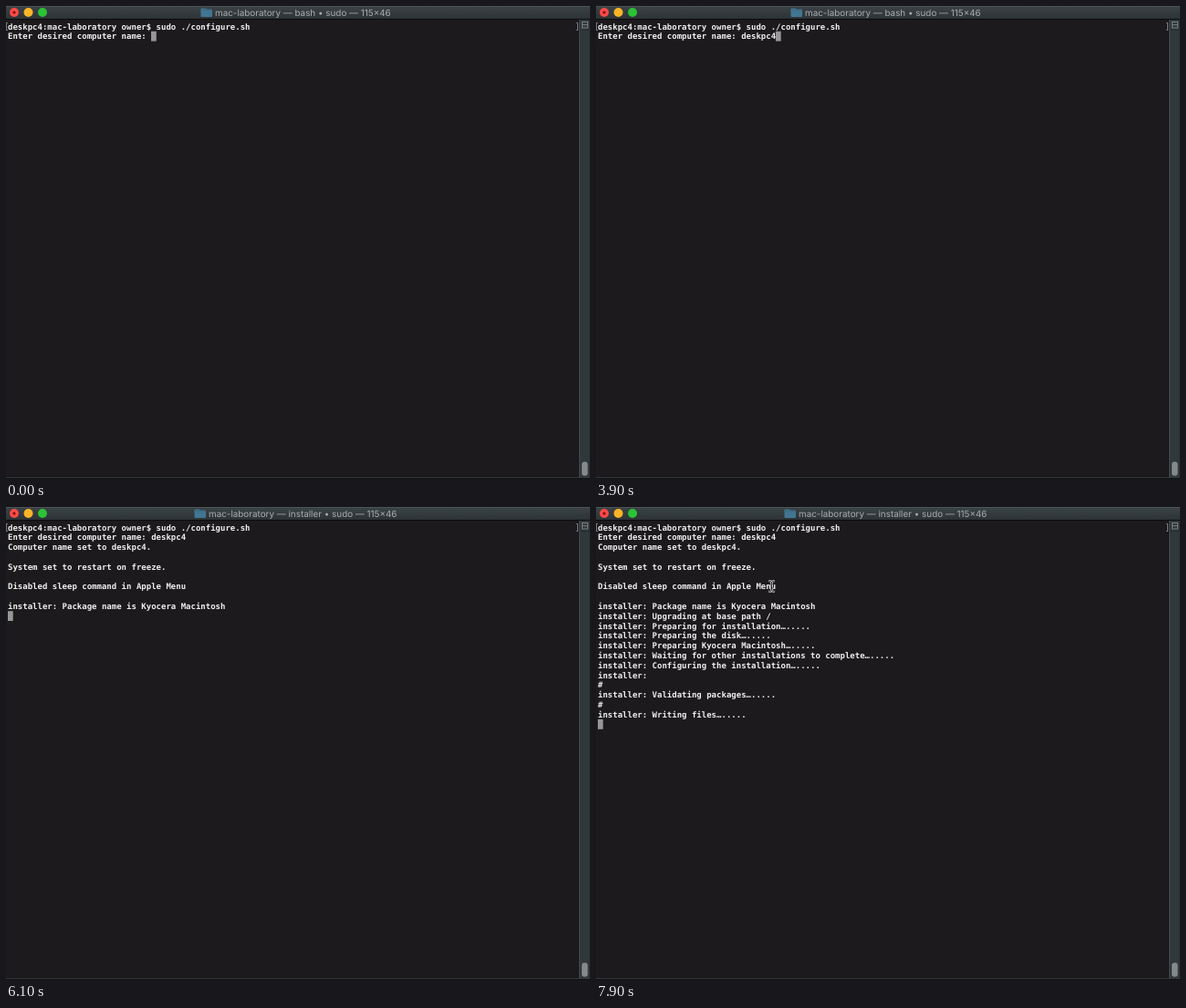
Write an HTML page with a canvas that moves like this. It is 640 by 519 pixels and loops after 8000 ms.

```html
<!DOCTYPE html>
<html lang="en">
<head>
<meta charset="utf-8">
<title>Terminal</title>
<style>
  html, body { margin: 0; width: 100%; height: 100%; overflow: hidden; background: #1c1a1c; }
  canvas { display: block; width: 640px; height: 519px; }
</style>
</head>
<body>
<canvas id="stage" width="640" height="519"></canvas>
<script>
const ctx = document.getElementById('stage').getContext('2d');
const LOOP = 8000;
const CELL = 5.415, ROW = 10.8, LEFT = 2, TOP = 17;
const HOST = 'deskpc4', USER = 'owner';
const ASK = 'Enter desired computer name: ';
const KEY_TIMES = [1500, 1700, 2400, 2700, 2900, 3400, 3900];
const ENTER = 5700, INSTALL = 6000, POINTER = 7800;

// Output lines with the time each one is printed
const OUTPUT = [
  [5700, `Computer name set to ${HOST}.`],
  [5700, ''],
  [5800, 'System set to restart on freeze.'],
  [5800, ''],
  [5800, 'Disabled sleep command in Apple Menu'],
  [5800, ''],
  [6100, 'installer: Package name is Kyocera Macintosh'],
  [6200, 'installer: Upgrading at base path /'],
  [6400, 'installer: Preparing for installation….....'],
  [6500, 'installer: Preparing the disk….....'],
  [6700, 'installer: Preparing Kyocera Macintosh….....'],
  [6900, 'installer: Waiting for other installations to complete….....'],
  [7000, 'installer: Configuring the installation….....'],
  [7100, 'installer:'],
  [7200, '#'],
  [7400, 'installer: Validating packages….....'],
  [7800, '#'],
  [7800, 'installer: Writing files….....']
];

function rect(x, y, w, h, color) {
  ctx.fillStyle = color;
  ctx.fillRect(x, y, w, h);
}

function dot(x, y, r, color) {
  ctx.fillStyle = color;
  ctx.beginPath();
  ctx.arc(x, y, r, 0, Math.PI * 2);
  ctx.fill();
}

function pill(x, y, w, h, r, color) {
  ctx.fillStyle = color;
  ctx.beginPath();
  ctx.roundRect(x, y, w, h, r);
  ctx.fill();
}

function path(points, color, width) {
  ctx.strokeStyle = color;
  ctx.lineWidth = width;
  ctx.beginPath();
  points.forEach(([x, y], i) => i ? ctx.lineTo(x, y) : ctx.moveTo(x, y));
  ctx.stroke();
}

function folder(x) {
  pill(x, 2.5, 6, 4, 1, '#427592');
  pill(x, 3.5, 12.5, 8.5, 1, '#427592');
  rect(x, 4.5, 12.5, 0.7, '#396780');
}

function titleBar(t) {
  const bar = ctx.createLinearGradient(0, 0, 0, 14);
  bar.addColorStop(0, '#3b4346');
  bar.addColorStop(1, '#2d3336');
  rect(0, 0, 640, 14, bar);
  rect(0, 0, 640, 0.6, '#596063');
  rect(0, 14, 640, 1, '#0c0c0d');

  dot(9, 7, 5, '#fb4a47');
  dot(9, 7, 1.6, '#7a0b0c');
  dot(24.5, 7, 5, '#fdb427');
  dot(40, 7, 5, '#2bc235');

  const busy = t >= INSTALL;
  const x = busy ? 206.5 : 213.5;
  folder(x);
  ctx.font = '9.9px Inter, "Liberation Sans", sans-serif';
  ctx.fillStyle = '#a9adae';
  ctx.fillText(`mac-laboratory — ${busy ? 'installer' : 'bash'} • sudo — 115×46`, x + 15.5, 10.7);
}

function scrollBar() {
  rect(628, 15, 12, 504, '#31383b');
  rect(628, 15, 1, 504, '#454a4c');
  rect(639, 15, 1, 504, '#2a3033');
  ctx.strokeStyle = '#8b9092';
  ctx.lineWidth = 0.8;
  ctx.strokeRect(631.5, 17.5, 6, 6.5);
  rect(632, 20.3, 5, 0.8, '#8b9092');
  rect(629, 26, 10, 0.8, '#22282a');
  pill(631, 500, 6.5, 15.5, 3.2, '#85898b');
  rect(0, 517, 640, 1, '#33393c');
  rect(0, 518, 640, 1, '#0d0e0f');
}

function print(text, row) {
  ctx.fillText(text, LEFT, TOP + 8.5 + row * ROW);
}

function terminal(t) {
  const typed = KEY_TIMES.filter(k => t >= k).length;
  const lines = [
    `${HOST}:mac-laboratory ${USER}$ sudo ./configure.sh`,
    ASK + HOST.slice(0, typed),
    ...OUTPUT.filter(([at]) => t >= at).map(([, text]) => text)
  ];
  ctx.font = 'bold 9px "DejaVu Sans Mono", monospace';
  ctx.fillStyle = '#efefef';
  lines.forEach(print);

  const done = t >= ENTER;
  const col = done ? 0 : ASK.length + typed;
  const row = done ? lines.length : 1;
  rect(LEFT + col * CELL, TOP + row * ROW, CELL + 0.3, ROW, '#989798');

  path([[2, 18.5], [0.5, 18.5], [0.5, 26.5], [2, 26.5]], '#999', 0.8);
  path([[625, 18.5], [626.5, 18.5], [626.5, 26.5], [625, 26.5]], '#999', 0.8);
}

function beam(x, y) {
  const strokes = [
    [[x - 3.5, y - 6], [x - 1, y - 5.5], [x, y - 4], [x + 1, y - 5.5], [x + 3.5, y - 6]],
    [[x, y - 4], [x, y + 4]],
    [[x - 3.5, y + 6], [x - 1, y + 5.5], [x, y + 4], [x + 1, y + 5.5], [x + 3.5, y + 6]],
    [[x - 1.8, y + 2], [x + 1.8, y + 2]]
  ];
  strokes.forEach(s => path(s, '#d8d8d8', 2.2));
  strokes.forEach(s => path(s, '#222', 0.9));
}

function draw(t) {
  rect(0, 0, 640, 519, '#1c1a1c');
  titleBar(t);
  scrollBar();
  terminal(t);
  if (t >= POINTER) beam(192.5, 87);
}

ctx.textRendering = 'geometricPrecision';
const start = performance.now();
function tick() {
  draw((performance.now() - start) % LOOP);
  requestAnimationFrame(tick);
}
tick();
</script>
</body>
</html>
```
